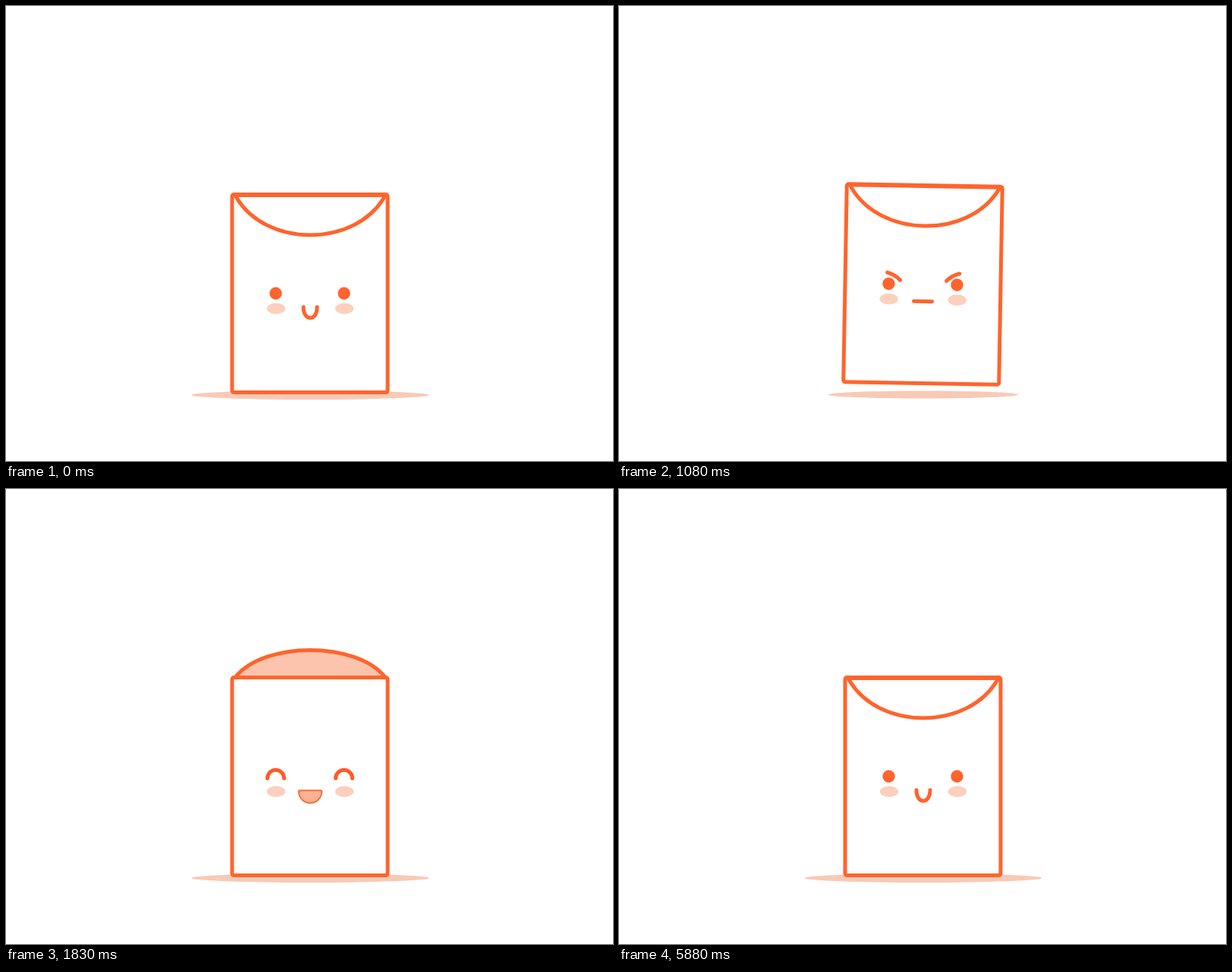
Animation of 800x600 px, one loop 6420 ms. Source, as an HTML page:

```html
<!DOCTYPE html>
<html lang="zh">
<head>
<meta charset="utf-8">
<title>Envelope</title>
<style>
  html, body { margin: 0; width: 100%; height: 100%; overflow: hidden; background: #fff; }
  svg { display: block; width: 100vw; height: 100vh; }
  .line { fill: none; stroke: #ff642d; stroke-width: 5; stroke-linecap: round; stroke-linejoin: round; }
  text { fill: #f8659e; font-family: "Noto Sans CJK SC", "Noto Sans CJK", "Noto Sans", sans-serif; }
</style>
</head>
<body>
<svg viewBox="0 0 800 600">
  <defs>
    <clipPath id="slot"><rect x="200" y="0" width="400" height="248"/></clipPath>
    <linearGradient id="fade" x1="0" y1="0" x2="0" y2="1">
      <stop offset="0" stop-color="#ff642d" stop-opacity=".3"/>
      <stop offset="1" stop-color="#ff642d" stop-opacity="0"/>
    </linearGradient>
  </defs>
  <ellipse id="shadow" cx="401" fill="#f8cab6"/>
  <g id="envelope">
    <path id="backFlap" class="line" style="fill:#fcc4ad"/>
    <g clip-path="url(#slot)">
      <g id="card">
        <path class="line" d="M326.5 270V128.5H474.5V270" style="fill:#fff;stroke-linejoin:miter"/>
        <g id="smear">
          <rect x="324" y="126" width="153" height="5" fill="#fff" opacity=".35"/>
          <rect x="329" y="131" width="143" height="10" fill="url(#fade)"/>
        </g>
        <text x="347" y="206" font-size="41" font-weight="500" letter-spacing="-1">5.20</text>
        <text x="431" y="205.5" font-size="21" font-weight="300">元</text>
      </g>
    </g>
    <rect class="line" x="298" y="248.5" width="205" height="261" rx="2.5" style="fill:#fff"/>
    <path id="frontFlap" class="line" style="fill:#fff"/>
    <g fill="#fdcfbd">
      <ellipse cx="356" cy="399" rx="12.2" ry="7.2"/>
      <ellipse cx="446" cy="399" rx="12.2" ry="7.2"/>
    </g>
    <g id="eyes" fill="#ff642d">
      <circle cx="355.5" cy="379" r="8.2"/>
      <circle cx="445.5" cy="379" r="8.2"/>
    </g>
    <path id="calm" class="line" d="M392 397C392 416 410 416 410 397"/>
    <path id="angry" class="line" d="M353.5 364.2Q364 367 370.5 374M448.5 364.2Q438 367 431.5 374M389 401.5H413"/>
    <g id="happy">
      <path class="line" d="M344.5 381.5a11 11 0 0 1 22 0M434.5 381.5a11 11 0 0 1 22 0" style="stroke:#ff5a2a"/>
      <path d="M387.5 397.5H414.5Q416.5 397.5 416.3 399.5C415.5 408 409 414 401 414S386.5 408 385.7 399.5Q385.5 397.5 387.5 397.5Z"
        fill="#ffb193" stroke="#f2703a" stroke-width="2"/>
    </g>
  </g>
  <g id="bits"></g>
</svg>
<script>
const LOOP = 6420, STEP = 30, CARD_TRAVEL = 126;
const $ = id => document.getElementById(id);
const part = {};
for (const id of ["shadow", "envelope", "backFlap", "frontFlap", "card", "smear", "eyes", "calm", "angry", "happy"]) {
  part[id] = $(id);
}

const ramp = (t, from, to) => Math.min(1, Math.max(0, (t - from) / (to - from)));
const easeOut = p => 1 - (1 - p) ** 2;
const easeInOut = p => p * p * (3 - 2 * p);
const backOut = p => 1 + 2.1 * (p - 1) ** 3 + 1.1 * (p - 1) ** 2;
const show = (el, on) => el.setAttribute("visibility", on ? "visible" : "hidden");
const set = (el, attrs) => { for (const k in attrs) el.setAttribute(k, attrs[k]); };

// Confetti: end point, radius, end time
const bits = [
  [150, 165, 4, 2460], [190, 240, 3, 2460], [220, 195, 4, 2460],
  [600, 155, 4, 2280], [580, 230, 3, 2280], [550, 185, 4, 2280]
].map(([x, y, r, end], i) => {
  const el = document.createElementNS("http://www.w3.org/2000/svg", "circle");
  el.setAttribute("fill", i % 2 ? "#f8659e" : "#ff642d");
  $("bits").appendChild(el);
  return { el, x, y, r, end };
});

// Triangle wave, two degrees either way
function shake(t) {
  const start = 472.5, period = 180;
  if (t < start || t > start + period * 6.5) return 0;
  const p = ((t - start) / period + 0.25) % 1;
  return 2 * (1 - 4 * Math.abs(p - 0.5));
}

const flapPath = (y, k) => `M302 ${y}C340 ${y + 70 * k} 462 ${y + 70 * k} 500 ${y}Z`;

function draw(t) {
  const air = easeOut(ramp(t, 300, 450)) - ramp(t, 1620, 1740) ** 2;
  set(part.shadow, { cy: 513 - 0.5 * air, rx: 156.5 - 31.5 * air, ry: 6 - air });
  set(part.envelope, { transform: `translate(0 ${-12 * air}) rotate(${shake(t)} 400.5 379)` });

  const open = easeInOut(ramp(t, 1740, 1860)) - easeInOut(ramp(t, 5760, 5880));
  const fold = 1 - 2 * open;
  set(part.backFlap, { d: flapPath(248.5, fold) });
  set(part.frontFlap, { d: flapPath(249.5, fold) });
  show(part.backFlap, fold < 0);
  show(part.frontFlap, fold >= 0);

  const out = backOut(ramp(t, 1830, 2070)) - ramp(t, 5640, 5760) ** 1.5;
  set(part.card, { transform: `translate(0 ${CARD_TRAVEL * (1 - out)})` });
  show(part.card, t > 1830 && t < 5760);
  show(part.smear, t >= 5640 && t < 5760);

  const mood = t < 330 || t >= 5790 ? "calm" : t < 1740 ? "angry" : "happy";
  for (const name of ["calm", "angry", "happy"]) show(part[name], mood === name);
  show(part.eyes, mood !== "happy");

  for (const { el, x, y, r, end } of bits) {
    const p = ramp(t, 1920, end), q = easeOut(p);
    set(el, {
      cx: 400 + (x - 400) * q,
      cy: 200 + (y - 200) * q - 30 * Math.sin(Math.PI * p),
      r: r * (1 - p * p)
    });
    show(el, p > 0 && p < 1);
  }
}

const began = performance.now();
function tick() {
  const t = (performance.now() - began) % LOOP;
  draw(Math.floor(t / STEP) * STEP);
  requestAnimationFrame(tick);
}
tick();
</script>
</body>
</html>
```
